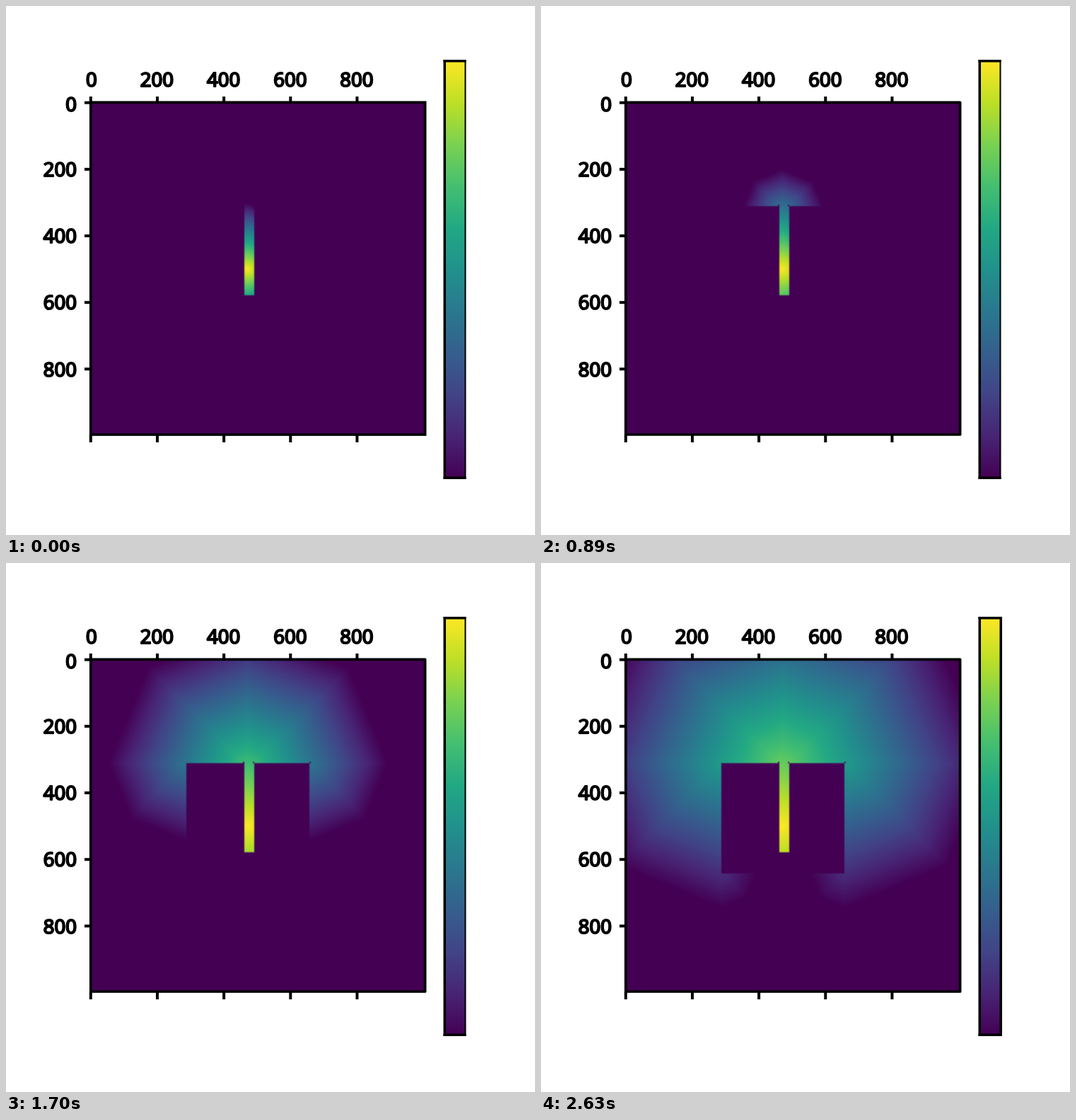
Recreate the animation shown at these times as an HTML page with a canvas. Size 748 by 748 pixels, loop 2860 ms.

```html
<!DOCTYPE html>
<html lang="en">
<head>
<meta charset="utf-8">
<title>Wave spreading from a slit</title>
<style>
  html, body { margin: 0; width: 100%; height: 100%; overflow: hidden; background: #fff; }
  canvas { display: block; }
</style>
</head>
<body>
<canvas id="stage" width="748" height="748"></canvas>
<script>
const ctx = document.getElementById('stage').getContext('2d');
const LOOP = 2860;
const steps = [
  { start: 0, reach: 200, edge: 2 },
  { start: 540, reach: 300, edge: 2 },
  { start: 1120, reach: 400, edge: 3.5 },
  { start: 1700, reach: 600, edge: 2 },
  { start: 2280, reach: 800, edge: 3.5 },
];

// Viridis colour map
const viridis = [
  [68, 1, 84], [72, 36, 117], [65, 68, 135], [53, 95, 141], [42, 120, 142], [33, 145, 140],
  [34, 168, 132], [68, 191, 112], [122, 209, 81], [189, 223, 38], [253, 231, 37],
];
function colour(v) {
  const p = Math.max(0, v) * 10, i = Math.min(9, Math.floor(p));
  return viridis[i].map((c, k) => c + (viridis[i + 1][k] - c) * (p - i));
}

// Plot geometry: data units run from 0 to 1000, the field has cells of 2 px
const X0 = 119.8, Y0 = 136.7, SCALE = 0.4708, CELL = 2;
const area = { x: 119, y: 135, cols: 237, rows: 236 };
const source = { x: 470, y: 500 };
const block = { left: 288, right: 658, top: 311, bottom: 640 };
const slit = { left: 460, right: 490, bottom: 580 };
const lips = [460, 490, 660];

// Length of a shortest path on an eight-neighbour grid
function octile(dx, dy) {
  const a = Math.abs(dx), b = Math.abs(dy);
  return Math.max(a, b) + (Math.SQRT2 - 1) * Math.min(a, b);
}

// Path that leaves the slit on one side and bends around the block
function around(side, x, y) {
  const inner = slit[side], outer = block[side];
  const toInner = octile(inner - source.x, source.y - block.top);
  if (y < block.top) return toInner + octile(x - inner, y - block.top);
  const toOuter = toInner + Math.abs(outer - inner);
  if (x < block.left || x > block.right) return toOuter + octile(x - outer, y - block.top);
  return toOuter + block.bottom - block.top + octile(x - outer, y - block.bottom);
}

function distance(x, y) {
  if (y > 305 && y < block.top && lips.some(end => x > end - 3 && x < end)) return Infinity;
  if (x >= slit.left && x < slit.right && y < slit.bottom) return octile(x - source.x, y - source.y);
  const under = x >= block.left && x <= block.right && y >= block.top;
  if (under && y < block.bottom) return Infinity;
  if (under) return Math.min(around('left', x, y), around('right', x, y));
  return around(x < source.x ? 'left' : 'right', x, y);
}

const field = document.createElement('canvas');
field.width = area.cols;
field.height = area.rows;
const fieldCtx = field.getContext('2d');

function drawField(reach) {
  const img = fieldCtx.createImageData(area.cols, area.rows);
  for (let j = 0, k = 0; j < area.rows; j++) {
    for (let i = 0; i < area.cols; i++, k += 4) {
      const x = (area.x + (i + 0.5) * CELL - X0) / SCALE;
      const y = (area.y + (j + 0.5) * CELL - Y0) / SCALE;
      img.data.set([...colour(1 - distance(x, y) / reach), 255], k);
    }
  }
  fieldCtx.putImageData(img, 0, 0);
  ctx.drawImage(field, area.x, area.y, area.cols * CELL, area.rows * CELL);
}

function label(text, x, y, align) {
  ctx.textAlign = align;
  ctx.fillText(text, x, y);
  ctx.strokeText(text, x, y);
}

function drawAxes() {
  ctx.fillStyle = ctx.strokeStyle = '#000';
  ctx.lineWidth = 3.7;
  ctx.strokeRect(119.8, 136.3, 472.8, 469.7);
  ctx.font = '27.5px "Open Sans", "Noto Sans", sans-serif';
  ctx.lineWidth = 2.2;
  ctx.lineJoin = 'round';
  for (let v = 0; v < 1000; v += 200) {
    const x = X0 + v * SCALE, y = Y0 + v * SCALE;
    const nudge = v ? 0 : 1.5;
    ctx.fillRect(x - 2, 128, 4, 8);
    ctx.fillRect(x - 2, 606, 4, 11);
    ctx.fillRect(111, y - 2, 8, 4);
    label(v, x - 0.5 + nudge, 114, 'center');
    label(v, 100, y + 10.3 + nudge, 'right');
  }
}

function drawColourBar(edge) {
  const ramp = ctx.createLinearGradient(0, 667, 0, 78);
  viridis.forEach((c, i) => ramp.addColorStop(i / 10, `rgb(${c})`));
  ctx.fillStyle = ramp;
  ctx.fillRect(620, 78, 30, 589);
  ctx.fillStyle = '#000';
  const left = 618.5, top = 76, right = 648.5, bottom = 669, line = 3.5;
  const width = right + edge - left;
  ctx.fillRect(left, top, width, line);
  ctx.fillRect(left, bottom - line, width, line);
  ctx.fillRect(left, top, line, bottom - top);
  ctx.fillRect(right, top, edge, bottom - top);
}

let shown;
function tick(now) {
  const t = now % LOOP;
  const step = steps.findLast(s => t >= s.start);
  if (step !== shown) {
    shown = step;
    ctx.fillStyle = '#fff';
    ctx.fillRect(0, 0, 748, 748);
    drawField(step.reach);
    drawAxes();
    drawColourBar(step.edge);
  }
  requestAnimationFrame(tick);
}
tick(performance.now());
</script>
</body>
</html>
```
